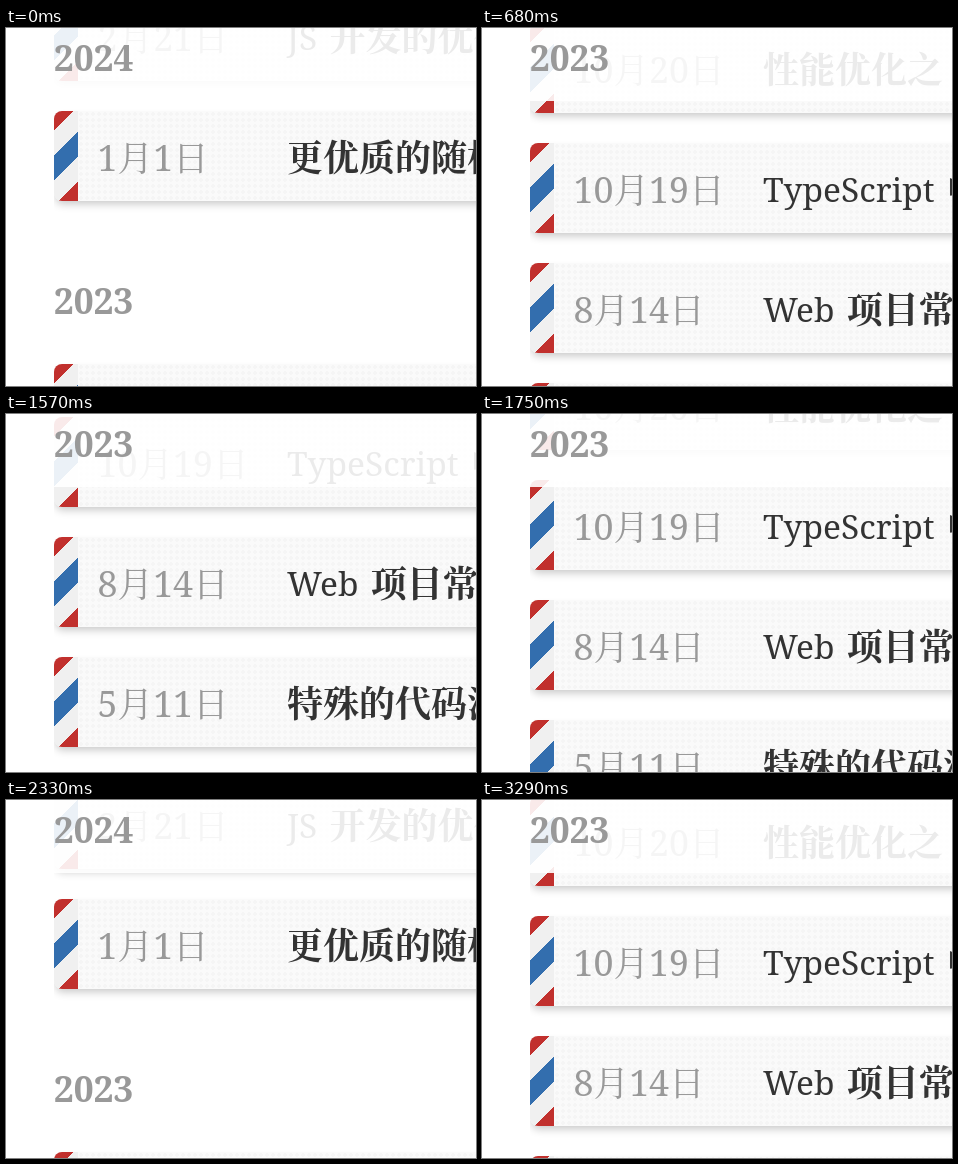
These frames come from a looping animation (470 px wide and 358 px high, 3360 ms). An HTML page:

```html
<!DOCTYPE html>
<html lang="zh-CN">
<head>
<meta charset="utf-8">
<title>Archive</title>
<style>
  html, body { margin: 0; width: 100%; height: 100%; overflow: hidden; background: #fff; }
  main {
    position: absolute; left: 48px; top: 0; right: 0; height: 358px; overflow: hidden;
    font: 36px/92px 'Noto Serif', 'Noto Serif CJK SC', 'Noto Sans CJK SC', 'Noto Sans CJK', serif;
    white-space: nowrap;
  }
  section { display: flow-root; margin-bottom: 40px; }
  h2 {
    position: sticky; top: 0; z-index: 1; height: 73px; margin: 0 0 20px;
    font-size: 35.5px; line-height: 58px; color: #999; background: rgba(255, 255, 255, .9);
  }
  article {
    position: relative; width: 700px; height: 90px; margin-bottom: 30px;
    border-radius: 8px; color: #333;
    background: radial-gradient(circle, #f5f5f5 1.5px, transparent 2px) 0 0 / 6px 6px #fafafa;
    box-shadow: 0 5px 8px -2px rgba(0, 0, 0, .22);
  }
  /* airmail edge */
  article::before {
    content: ''; position: absolute; left: 0; top: 0; width: 24px; height: 90px;
    border-radius: 8px 0 0 8px;
    background: linear-gradient(135deg, #c1302d 13.5px, #f0f0f0 13.8px 31.4px,
      #336eae 31.7px 48.9px, #f0f0f0 49.2px 66.8px, #c1302d 67.1px);
  }
  time, b { position: absolute; top: 0; }
  time { left: 43.5px; font-size: 35.7px; color: #999; }
  b { left: 233px; top: 1px; font-weight: 600; }
  i { font: 400 33.5px/0 'Noto Serif', serif; vertical-align: 1px; word-spacing: 3.5px; }
</style>
</head>
<body>
<main>
  <section>
    <h2>2024</h2>
    <article><time>2月21日</time><b><i>JS </i>开发的优化</b></article>
    <article><time>1月1日</time><b>更优质的随机数</b></article>
  </section>
  <section>
    <h2>2023</h2>
    <article><time>10月20日</time><b>性能优化之</b></article>
    <article><time>10月19日</time><b><i>TypeScript </i>中</b></article>
    <article><time>8月14日</time><b><i>Web </i>项目常用</b></article>
    <article><time>5月11日</time><b>特殊的代码注释</b></article>
  </section>
</main>
<script>
  const LOOP = 3360, START = 130;
  const easeOut = u => 1 - (1 - u) ** 1.72;
  const easeInOut = u => (1 - Math.cos(Math.PI * u)) / 2;
  const linear = u => u;

  // Each scroll gesture continues from where the previous one stopped.
  const gestures = [
    { from: 170, until: 680, to: 340, ease: easeOut },
    { from: 680, until: 860, to: 451, ease: easeOut },
    { from: 1230, until: 1300, to: 453, ease: linear },
    { from: 1570, until: 2330, to: -16, ease: easeInOut },
    { from: 2500, until: 2540, to: 0, ease: linear },
    { from: 2790, until: 3300, to: 340, ease: easeOut }
  ];

  function offsetAt(t) {
    let y = 0;
    for (const { from, until, to, ease } of gestures) {
      const u = Math.min(Math.max((t - from) / (until - from), 0), 1);
      y += (to - y) * ease(u);
    }
    return Math.round(y);
  }

  const main = document.querySelector('main');
  const begin = performance.now();
  function draw() {
    main.scrollTop = START + offsetAt((performance.now() - begin) % LOOP);
    requestAnimationFrame(draw);
  }
  draw();
</script>
</body>
</html>
```
